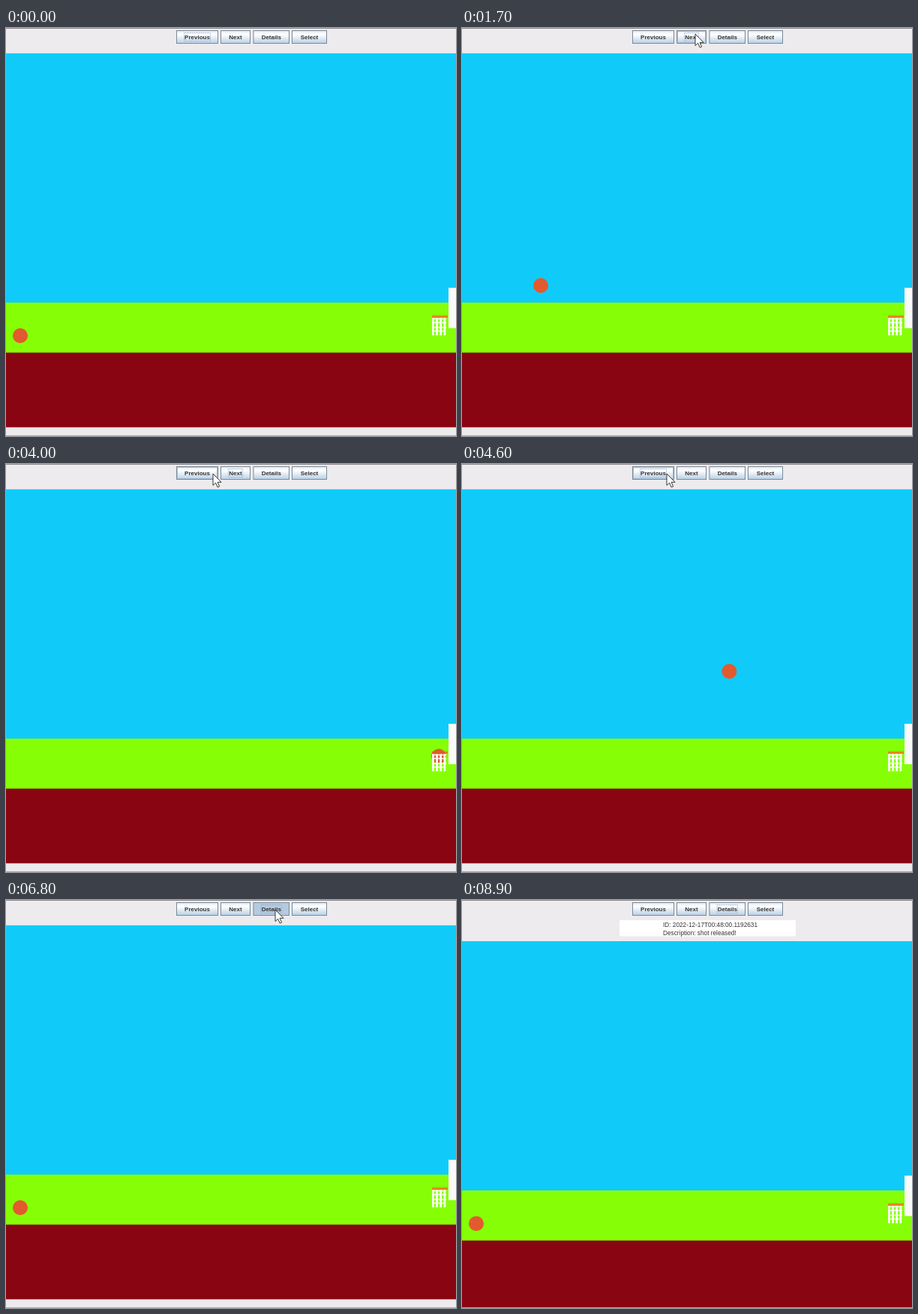
These frames come from a looping animation (600 by 545 pixels, 9.3 s). An HTML page:

```html
<!DOCTYPE html>
<html lang="en">
<head>
<meta charset="utf-8">
<title>Shot viewer</title>
<style>
  html, body { margin: 0; width: 100%; height: 100%; overflow: hidden; background: #edebed; }
  svg { display: block; width: 600px; height: 545px; }
  text { font-family: "Liberation Sans", Arial, sans-serif; fill: #333; }
  .button text { font-size: 8px; font-weight: bold; text-anchor: middle; }
  .face { fill: url(#metal); stroke: #7a8a99; }
  .pressed .face { fill: #b5cadf; }
  .rim, .focus { fill: none; visibility: hidden; }
  .rim { stroke: #a9bfd6; }
  .focus { stroke: #8ea6cc; stroke-width: .7; stroke-dasharray: 1 .5; }
  .hover .rim, .focused .focus { visibility: visible; }
  .pressed .rim { visibility: hidden; }
  #details text { font-size: 8.25px; }
</style>
</head>
<body>
<svg viewBox="0 0 600 545">
  <defs>
    <linearGradient id="metal" x2="0" y2="1">
      <stop offset="0" stop-color="#dfe9f3"/>
      <stop offset=".3" stop-color="#fff"/>
      <stop offset="1" stop-color="#b8cfe5"/>
    </linearGradient>
  </defs>
  <rect width="600" height="545" fill="#edebed"/>
  <g id="scene">
    <rect y="433" width="600" height="100.4" fill="#8a0512"/>
    <rect y="366" width="600" height="67.6" fill="#86ff06"/>
    <rect y="33.8" width="600" height="333" fill="#10cbfa"/>
    <rect x="590" y="347" width="10" height="54" fill="#fafafa"/>
    <rect x="568" y="384" width="21" height="3" fill="#e28a14"/>
    <circle id="ball" r="10" fill="#e35a2e"/>
    <g fill="none" stroke="#fff">
      <path d="M569.5 387.5V410.5M574.6 387.5V410.5M579.7 387.5V410.5M584.9 387.5V410.5" stroke-width="2.7"/>
      <path d="M568 388.5H587M568 393.5H587M568 400H587M568 405H586" stroke-width="1.3"/>
    </g>
  </g>
  <g id="details">
    <rect x="210" y="27" width="235" height="21.5" fill="#fff"/>
    <text x="268" y="36.3">ID: 2022-12-17T00:48:00.1192631</text>
    <text x="268" y="46.8">Description: shot released!</text>
  </g>
  <path d="M0 .5H600" stroke="#8d8b8d"/>
  <path d="M0 544.5H600" stroke="#a9a7a9"/>
  <g id="buttons"></g>
  <path id="cursor" d="M0 0V15.5L3.6 12.2L6.2 18L8.6 17L6.1 11.3H11Z" fill="#fff" stroke="#222" stroke-width=".9"/>
</svg>
<script>
const byId = id => document.getElementById(id);
const LOOP = 9300, TICK = 100, HOLD = 70;
const PREVIOUS = 0, NEXT = 1, DETAILS = 2;
const OPEN_SHIFT = 21.2;

const buttons = [
  ["Previous", 227, 56], ["Next", 286, 40], ["Details", 329.5, 48.5], ["Select", 381, 47]
].map(([label, x, w]) => ({ label, x, w }));

byId("buttons").innerHTML = buttons.map(({ label, x, w }) => `
  <g class="button">
    <rect class="face" x="${x + .5}" y="3.5" width="${w - 1}" height="17"/>
    <rect class="rim" x="${x + 1.5}" y="4.5" width="${w - 3}" height="15"/>
    <rect class="focus" x="${x + 10.5}" y="6.5" width="${w - 21}" height="11"/>
    <text x="${x + w / 2}" y="15.3">${label}</text>
  </g>`).join("");
const buttonNodes = [...byId("buttons").children];

// Snapshots: release, six even steps along the throw, then the basket
const FLIGHT_STEPS = 6;
function ballAt(step) {
  if (step === 0) return [19, 411];
  if (step > FLIGHT_STEPS) return [577, 390.5];
  return [21.2 + 83.8 * step, 274.2 + 11.17 * (step - 3.5) ** 2];
}

// Release time, button
const clicks = [
  [1500, NEXT], [2150, NEXT], [2290, NEXT], [2430, NEXT], [2570, NEXT], [2700, NEXT], [2950, NEXT],
  [4250, PREVIOUS], [4400, PREVIOUS], [4580, PREVIOUS],
  [4900, PREVIOUS], [5080, PREVIOUS], [5250, PREVIOUS], [5450, PREVIOUS],
  [6860, DETAILS]
];

// Time, x, y of the pointer tip
const pointer = [
  [300, 480, 30], [900, 327, 8], [1100, 311, 8], [3200, 311, 8], [4000, 276, 13],
  [4200, 273, 13], [5900, 273, 13], [6200, 332, 15], [6400, 332, 15], [6700, 359, 13],
  [8500, 359, 13], [8700, 396, 17], [8800, 418, 12]
];

function pointerAt(t) {
  const i = pointer.findIndex(key => key[0] >= t);
  if (i < 0 || t < pointer[0][0]) return null;
  const [t1, x1, y1] = pointer[i], [t0, x0, y0] = pointer[Math.max(0, i - 1)];
  const k = t1 > t0 ? (t - t0) / (t1 - t0) : 1;
  return [x0 + (x1 - x0) * k, y0 + (y1 - y0) * k];
}

function draw(t) {
  let step = 0, open = false, focused = PREVIOUS, pressed = -1;
  for (const [release, button] of clicks) {
    if (t < release - HOLD) break;
    focused = button;
    if (t < release) pressed = button;
    else if (button === DETAILS) open = !open;
    else step += button === NEXT ? 1 : -1;
  }

  const tip = pointerAt(t);
  byId("cursor").style.display = tip ? "" : "none";
  if (tip) byId("cursor").setAttribute("transform", `translate(${tip})`);

  buttonNodes.forEach((node, i) => {
    const { x, w } = buttons[i];
    // The highlight reaches slightly past the left edge
    const hover = tip && tip[0] >= x - 3 && tip[0] < x + w && tip[1] >= 3 && tip[1] < 21;
    node.classList.toggle("hover", Boolean(hover));
    node.classList.toggle("pressed", i === pressed);
    node.classList.toggle("focused", i === focused);
  });

  byId("ball").setAttribute("transform", `translate(${ballAt(step)})`);
  byId("scene").setAttribute("transform", `translate(0 ${open ? OPEN_SHIFT : 0})`);
  byId("details").style.display = open ? "" : "none";
}

const start = performance.now();
function frame() {
  const t = (performance.now() - start) % LOOP;
  draw(Math.floor(t / TICK) * TICK);
  requestAnimationFrame(frame);
}
frame();
</script>
</body>
</html>
```
